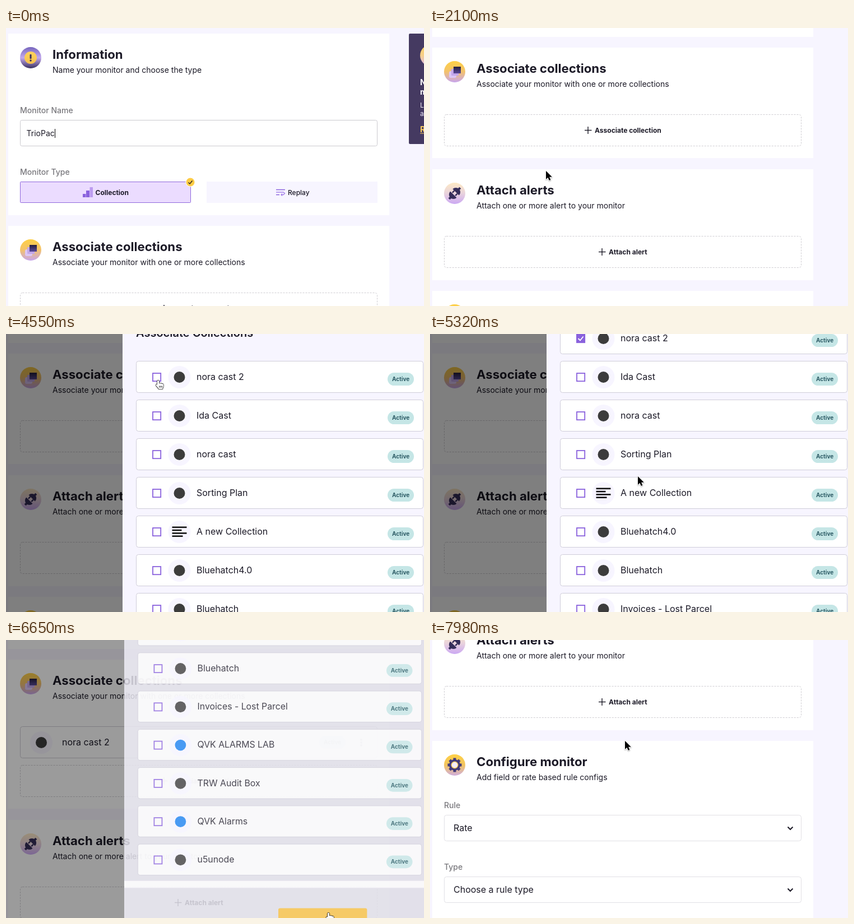
Recreate the animation shown at these times as an HTML page with a canvas. Size 746 by 496 pixels, loop 8000 ms.

```html
<!DOCTYPE html>
<html lang="en">
<head>
<meta charset="utf-8">
<title>Monitor setup</title>
<style>
html, body { margin: 0; width: 100%; height: 100%; overflow: hidden; background: #f7f5ff; }
canvas { display: block; width: 746px; height: 496px; }
</style>
</head>
<body>
<canvas id="stage"></canvas>
<script>
const W = 746, H = 496, LOOP = 8000, STEP = 70;
const canvas = document.getElementById('stage');
const c = canvas.getContext('2d');
const dpr = window.devicePixelRatio || 1;
canvas.width = W * dpr;
canvas.height = H * dpr;

const INK = '#1c1a27', LILAC = '#f7f5ff', PURPLE = '#8a62dd', YELLOW = '#ffd05f', GREY = '#79787d';
const PICKED = 'nora cast 2';
const ROWS = [
  [PICKED], ['Ida Cast'], ['nora cast'], ['Sorting Plan'], ['A new Collection', 'lines'],
  ['Bluehatch4.0'], ['Bluehatch'], ['Invoices - Lost Parcel'], ['QVK ALARMS LAB', 'blue'],
  ['TRW Audit Box'], ['QVK Alarms', 'blue'], ['u5unode']
];

// ---- timing ----
const lerp = (a, b, u) => a + (b - a) * u;
const span = (t, from, to) => Math.min(1, Math.max(0, (t - from) / (to - from)));
const easeOut = u => 1 - (1 - u) ** 2.5;
const easeIn = u => u * u;
function ramp(t, from, to) {
  const u = span(t, from, to);
  return u * u * (3 - 2 * u);
}
// time, x, y of the pointer
const PATH = [
  [1120, 523, 276], [1260, 523, 276], [1580, 207, 255], [2100, 207, 255], [2450, 285, 184], [2660, 285, 184],
  [2870, 289, 196], [3010, 289, 196], [3640, 282, 172], [3850, 282, 172], [4130, 271, 82],
  [4760, 271, 82], [5250, 371, 254], [5740, 371, 254], [6440, 575, 486],
  [6650, 575, 486], [6860, 575, 427], [7350, 348, 180], [LOOP, 348, 180]
];
const HAND = [[1120, 1400], [2240, 2730], [4130, 4830], [6400, 6930]];
function pointerAt(t) {
  const i = PATH.findIndex(k => k[0] > t);
  const a = PATH[i - 1], b = PATH[i], u = ramp(t, a[0], b[0]);
  return [lerp(a[1], b[1], u), lerp(a[2], b[2], u)];
}

// ---- helpers ----
function text(s, x, y, size, weight = 400, color = INK) {
  c.font = `${weight} ${size}px Inter, "Open Sans", sans-serif`;
  c.fillStyle = color;
  c.fillText(s, x, y);
  return c.measureText(s).width;
}
function rect(x, y, w, h, color) {
  c.fillStyle = color;
  c.fillRect(x, y, w, h);
}
function box(x, y, w, h, r, fill, line, dash) {
  const o = line ? 0.5 : 0;
  c.beginPath();
  c.roundRect(x + o, y + o, w - 2 * o, h - 2 * o, r);
  if (fill) { c.fillStyle = fill; c.fill(); }
  if (line) {
    c.strokeStyle = line;
    c.lineWidth = 1;
    c.setLineDash(dash || []);
    c.stroke();
    c.setLineDash([]);
  }
}
function disc(x, y, r, fill) {
  c.beginPath();
  c.arc(x, y, r, 0, 7);
  c.fillStyle = fill;
  c.fill();
}
function line(points, color, width) {
  c.beginPath();
  points.forEach(([x, y]) => c.lineTo(x, y));
  c.strokeStyle = color;
  c.lineWidth = width;
  c.stroke();
}
function fade(y0, y1, ...colors) {
  const g = c.createLinearGradient(0, y0, 0, y1);
  colors.forEach((col, i) => g.addColorStop(i / (colors.length - 1), col));
  return g;
}
function at(x, y, draw) {
  c.save();
  c.translate(x, y);
  draw();
  c.restore();
}

// ---- section icons, centred on 0,0 ----
function infoIcon() {
  disc(0, 0, 19, fade(-19, 19, '#7565bd', '#c3a9ee', '#3b3260'));
  disc(0, 0, 11, fade(-11, 11, '#ffd35a', '#f6c04f'));
  box(-1.5, -6, 3, 8, 1, '#3a3057');
  disc(0, 5, 1.7, '#3a3057');
}
function stackIcon() {
  disc(0, 0, 19, fade(-19, 19, '#fed045', '#f3c26c', '#c7a5ee'));
  box(-10, -1, 13, 12, 3, '#dcc6f6');
  box(-6, -5, 13, 12, 1, '#c3a7ea');
  rect(-2, -9, 13, 12, fade(-9, 3, '#251e3d', '#5b4a99'));
}
function plugIcon() {
  disc(0, 0, 19, fade(-19, 19, '#fde9c4', '#e9d3dd', '#cba8f3'));
  c.rotate(-Math.PI / 4);
  c.fillStyle = '#352d59';
  for (const s of [-1, 1]) {
    c.beginPath();
    c.arc(s * 3, 0, 8, s > 0 ? -Math.PI / 2 : Math.PI / 2, s > 0 ? Math.PI / 2 : Math.PI * 1.5);
    c.fill();
    c.fillRect(s > 0 ? 10 : -14, -2, 4, 4);
  }
  c.fillRect(-2, -5, 5, 2.5);
  c.fillRect(-2, 2.5, 5, 2.5);
}
function gearIcon() {
  disc(0, 0, 19, fade(-19, 19, '#fed045', '#f2c45f', '#d0aede'));
  c.fillStyle = '#413a7c';
  for (let i = 0; i < 8; i++) {
    c.fillRect(-2.5, -12.5, 5, 6);
    c.rotate(Math.PI / 4);
  }
  disc(0, 0, 10, '#413a7c');
  disc(0, 0, 6.5, '#f8cb58');
  disc(0, 0, 5, '#f4edff');
}

// ---- page parts ----
function panel(y, h, icon, title, sub) {
  rect(4, y, 680, h, '#fff');
  at(44, y + 43, icon);
  text(title, 83, y + 45, 22.15, 700);
  text(sub, 83, y + 70, 14);
}
function addButton(y, label, plusX) {
  box(25, y, 638, 57, 4, '#fff', '#cfcdd2', [3, 2]);
  line([[plusX - 6, y + 28.5], [plusX + 6.5, y + 28.5]], INK, 1.4);
  line([[plusX, y + 22], [plusX, y + 35]], INK, 1.4);
  text(label, plusX + 12, y + 33, 12, 700);
}
function select(y, label, value) {
  text(label, 25, y, 14, 500, GREY);
  box(25, y + 12, 638, 47, 4, '#fff', '#e1e0e5');
  text(value, 42, y + 41, 16);
  line([[638.5, y + 33.5], [643, y + 38], [647.5, y + 33.5]], INK, 2);
}
function badge(x, y) {
  box(x, y, 47, 23, 11.5, '#c5e6e6');
  text('Active', x + 8, y + 15, 10, 700, '#2c5b65');
}
function mark(x, y, kind) {
  disc(x, y, 20, LILAC);
  if (kind === 'lines') {
    [26, 17, 26, 19].forEach((w, i) => rect(x - 13, y - 9.5 + i * 5.3, w, 2.6, '#121212'));
  } else {
    disc(x, y, 10, kind === 'blue' ? '#1a82f0' : '#3c3c3c');
  }
}

function infoPanel(t) {
  panel(10, 324, infoIcon, 'Information', 'Name your monitor and choose the type');
  text('Monitor Name', 25, 152, 14, 500, GREY);
  box(25, 164, 638, 47, 3, '#fff', '#cbcacf');
  const w = text(t < 140 ? 'TrioPac' : 'TrioPace', 36.5, 193, 14);
  if (t < 630 || (t >= 1120 && t < 1610)) rect(Math.round(36.5 + w), 180, 1, 16, '#000');

  text('Monitor Type', 25, 262, 14, 500, GREY);
  box(25, 274, 305, 38, 1, '#ebdcff', '#8f68dc');
  rect(137, 296, 5.5, 6, '#8a62dd');
  rect(143, 290, 6, 12, '#8a62dd');
  rect(149.5, 284, 5.5, 18, '#bd9cf0');
  text('Collection', 159.5, 298, 12, 700);
  disc(329, 275, 8.5, '#fff');
  disc(329, 275, 7.5, '#fdcb45');
  line([[325.5, 275.5], [328, 278], [332.5, 272.5]], INK, 1.3);

  rect(358, 274, 305, 38, LILAC);
  line([[482, 288.5], [498, 288.5]], PURPLE, 1.5);
  line([[482, 293], [495, 293], [497.5, 295], [495, 297.5], [491, 297.5]], '#a683ea', 1.5);
  line([[482, 297.5], [488, 297.5]], PURPLE, 1.5);
  line([[493, 295.5], [491, 297.5], [493, 299.5]], '#a683ea', 1.2);
  text('Replay', 503, 298, 12, 500);
}
function sideCard() {
  box(719, 10, 60, 197, 2, '#453a61');
  disc(758, 49, 19, fade(30, 68, '#fdd25c', '#f6cf8a', '#d9b8ee'));
  text('N', 739, 102, 14, 700, '#fff');
  text('m', 739, 119, 14, 700, '#fff');
  text('L', 739, 142, 12, 400, '#efeaf8');
  text('a', 739, 157, 12, 400, '#efeaf8');
  text('R', 739, 186, 14, 700, YELLOW);
  rect(739, 187.5, 10, 1, YELLOW);
}
function page(t, added) {
  const scroll = 318 * ramp(t, 1470, 2100) + 358 * ramp(t, 7420, 7980);
  const extra = added ? 69 : 0;
  at(0, -Math.round(scroll), () => {
    infoPanel(t);
    sideCard();
    panel(353, 197 + extra, stackIcon, 'Associate collections', 'Associate your monitor with one or more collections');
    if (added) {
      box(25, 472, 638, 57, 4, '#fff', '#cfcdd4');
      mark(63, 501, '');
      text(PICKED, 100, 506, 16);
      badge(559, 489);
      for (const y of [496, 501, 506]) disc(634, y, 2, '#55535c');
    }
    addButton(472 + extra, 'Associate collection', 282);
    c.translate(0, extra);
    panel(570, 198, plugIcon, 'Attach alerts', 'Attach one or more alert to your monitor');
    addButton(689, 'Attach alert', 307);
    panel(787, 420, gearIcon, 'Configure monitor', 'Add field or rate based rule configs');
    select(907, 'Rule', 'Rate');
    select(1017, 'Type', 'Choose a rule type');
  });
}

// ---- dialog ----
function dialogRow([name, kind], i, checked) {
  const y = 48 + 69 * i;
  box(232, y, 513, 57, 4, '#fff', '#cfcdd9');
  c.strokeStyle = PURPLE;
  c.lineWidth = 1.8;
  c.strokeRect(262, y + 22, 14.2, 14.2);
  if (checked) {
    rect(261, y + 21, 16, 16, PURPLE);
    line([[264.5, y + 29], [268, y + 32.5], [273.5, y + 25.5]], '#fff', 1.8);
  }
  mark(309.5, y + 29, kind);
  text(name, 340, y + 34, 16);
  badge(681, y + 21);
}
function dialog(t, open, hot) {
  rect(0, 0, W, H, `rgba(0,0,0,${0.5 * open})`);
  c.save();
  c.globalAlpha = open;
  const k = lerp(0.95, 1, open);
  c.translate(488, 330);
  c.scale(k, k);
  c.translate(-488, -330);
  rect(208, -200, 561, 960, LILAC);
  c.translate(0, -Math.round(443 * ramp(t, 5180, 5740)));
  text('Associate Collections', 232, 5, 20, 600);
  ROWS.forEach((row, i) => dialogRow(row, i, i === 0 && t >= 4620));
  rect(208, 873, 561, 14, '#fff');
  rect(208, 873, 561, 1, '#e4e1ec');
  rect(208, 886, 561, 1, '#e4e1ec');
  box(486, 923, 160, 48, 3, hot ? '#fbc444' : YELLOW);
  c.restore();
}

// ---- pointer ----
const arrow = new Path2D('M0 0V15L3.4 11.8L5.8 17L8.4 15.9L6.1 10.8H10.8Z');
const hand = new Path2D('M3 8.5V2a1.5 1.5 0 0 1 3 0V7a1.4 1.4 0 0 1 2.8-.2a1.4 1.4 0 0 1 2.6.6a1.3 1.3 0 0 1 2.4.8V11c0 2-1.3 3-1.5 5H5.5C5 14 2 12 .6 9.8c-.8-1.6 1-2.7 2.4-1.3z');
function pointer(t) {
  if (t < 1120) return;
  const [x, y] = pointerAt(t);
  const isHand = HAND.some(([a, b]) => t >= a && t < b);
  at(x - (isHand ? 4 : 0), y, () => {
    c.lineJoin = 'round';
    c.lineWidth = isHand ? 1.2 : 2;
    c.strokeStyle = isHand ? '#000' : '#fff';
    c.fillStyle = isHand ? '#fff' : '#000';
    c.shadowColor = 'rgba(0,0,0,.3)';
    c.shadowBlur = 2;
    c.shadowOffsetY = 1;
    c.stroke(isHand ? hand : arrow);
    c.shadowColor = 'transparent';
    c.fill(isHand ? hand : arrow);
    if (isHand) for (const k of [6.8, 9, 11.2]) line([[k, 10.5], [k, 13.5]], '#000', 0.9);
  });
}

function draw(now) {
  const t = Math.floor((now % LOOP) / STEP) * STEP;
  c.setTransform(dpr, 0, 0, dpr, 0, 0);
  rect(0, 0, W, H, LILAC);
  page(t, t >= 6580);
  const open = easeOut(span(t, 2690, 2990)) - easeIn(span(t, 6530, 6790));
  if (open > 0) dialog(t, open, t >= 6400);
  pointer(t);
}

const start = performance.now();
function tick() {
  draw(performance.now() - start);
  requestAnimationFrame(tick);
}
tick();
</script>
</body>
</html>
```
